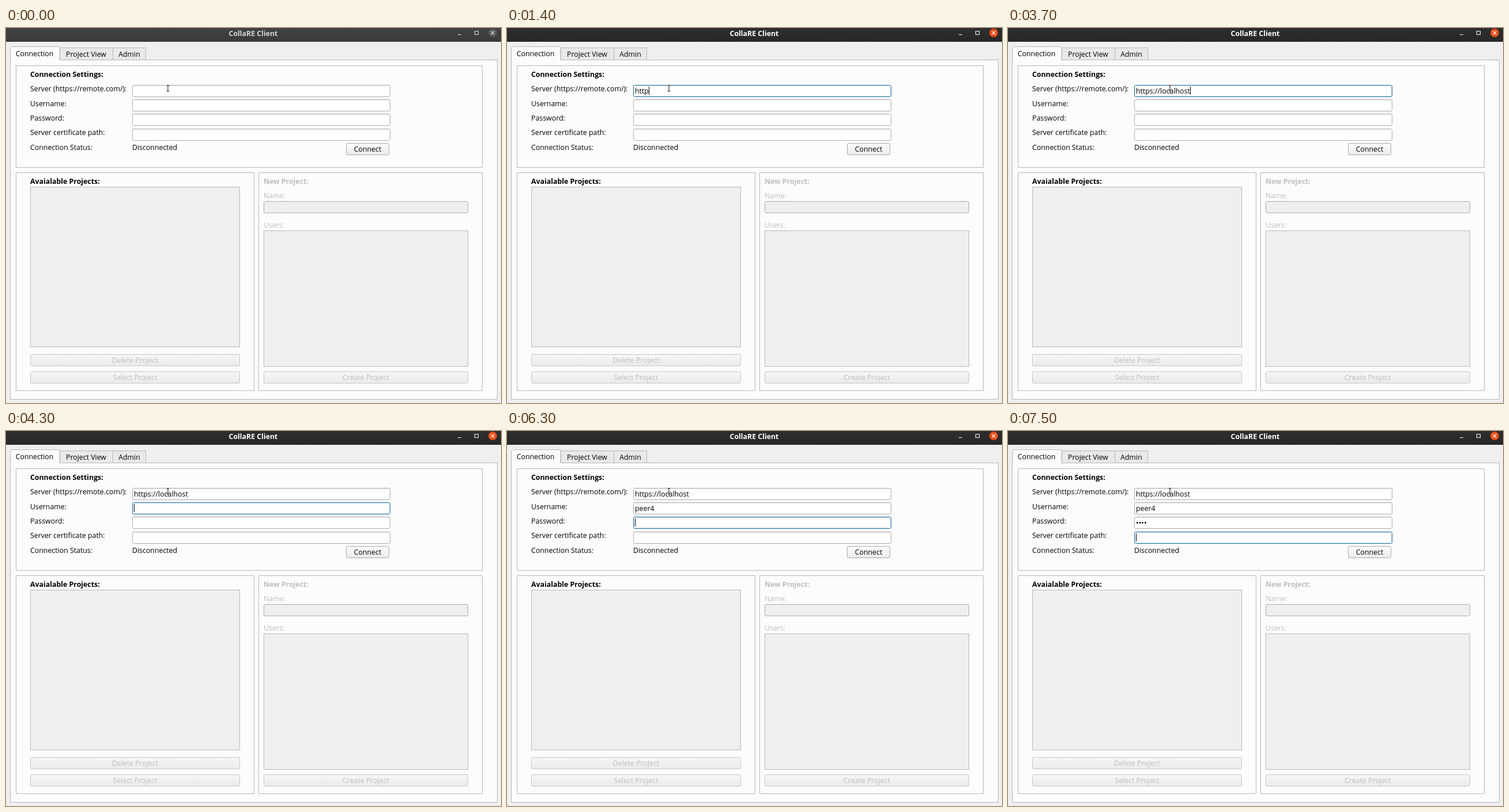
An HTML page for the animation above (8000 ms loop, 859 by 652 pixels).

```html
<!DOCTYPE html>
<html lang="en">
<head>
<meta charset="utf-8">
<title>CollaRE Client</title>
<style>
  html, body { margin: 0; width: 100%; height: 100%; overflow: hidden; background: #efefef; }
  svg { display: block; }
  text { font: 12.35px "Open Sans", "Noto Sans", sans-serif; white-space: pre; }
  .bold { font-weight: 700; }
  .mid { text-anchor: middle; }
  .off { fill: #bebebe; }
</style>
</head>
<body>
<svg id="stage" width="859" height="652" viewBox="0 0 859 652">
  <defs>
    <linearGradient id="button" x2="0" y2="1"><stop stop-color="#fcfcfc"/><stop offset="1" stop-color="#ebebeb"/></linearGradient>
    <linearGradient id="disabled" x2="0" y2="1"><stop stop-color="#f6f6f6"/><stop offset="1" stop-color="#ebebeb"/></linearGradient>
    <linearGradient id="idle" x2="0" y2="1"><stop stop-color="#424242"/><stop offset="1" stop-color="#3a3a3a"/></linearGradient>
    <linearGradient id="active" x2="0" y2="1"><stop stop-color="#2e2e2e"/><stop offset="1" stop-color="#272727"/></linearGradient>
  </defs>
</svg>
<script>
const stage = document.getElementById('stage');
const LOOP = 8000, ACTIVATE = 300;
const OUTLINE = '#ababab', FRAME = '#b8b8b8', FOCUS = '#266f9e';

function add(tag, attrs, content = '') {
  const el = document.createElementNS('http://www.w3.org/2000/svg', tag);
  for (const key in attrs) el.setAttribute(key, attrs[key]);
  el.textContent = content;
  return stage.appendChild(el);
}
// Outlined box covering whole pixels x..x+width, y..y+height
const box = (x, y, width, height, fill, stroke, rx = 0) =>
  add('rect', { x: x + .5, y: y + .5, width: width - 1, height: height - 1, fill, stroke, rx });
const label = (x, y, content, cls = '') => add('text', { x, y, class: cls }, content);
const path = (d, stroke, width = 1) => add('path', { d, stroke, fill: 'none', 'stroke-width': width });

function button(x, y, width, content, enabled) {
  box(x, y, width, 21, `url(#${enabled ? 'button' : 'disabled'})`, enabled ? OUTLINE : '#c6c6c6', 2);
  label(x + width / 2, y + 15, content, enabled ? 'mid' : 'mid off');
}

// Title bar
const bar = add('rect', { width: 859, height: 24 });
const title = label(429, 13.5, 'CollaRE Client', 'bold mid');
const close = add('circle', { cx: 844.5, cy: 8.5, r: 7.5 });
const icons = path('M784 11.5h6M813.5 5.5h6v6h-6zM841.5 5.5l6 6M847.5 5.5l-6 6', '#fff', 1.1);

// Tabs
box(7, 55, 846, 591, '#fcfcfc', FRAME);
box(93, 34, 93, 22, '#e9e9e9', FRAME);
box(185, 34, 58, 22, '#e9e9e9', FRAME);
path('M7.5 56V34.5q0-2 2-2h81.5q2 0 2 2V56', FRAME).setAttribute('fill', '#fcfcfc');
label(49.5, 49, 'Connection', 'mid');
label(139, 50, 'Project View', 'mid');
label(214, 50, 'Admin', 'mid');

// Connection settings
box(17, 65, 810, 178, 'none', FRAME);
label(42, 85, 'Connection Settings:', 'bold');
['Server (https://remote.com/):', 'Username:', 'Password:', 'Server certificate path:', 'Connection Status:']
  .forEach((name, i) => label(42, 110.4 + i * 25.3, name));
label(219, 212, 'Disconnected');
button(590, 200, 75, 'Connect', true);

// Projects
box(17, 251, 414, 380, 'none', FRAME);
label(42, 271, 'Avaialable Projects:', 'bold');
box(42, 276, 364, 279, '#efefef', FRAME);
button(42, 567, 364, 'Delete Project');
button(42, 597, 364, 'Select Project');

box(438, 251, 389, 380, 'none', FRAME);
label(447, 271, 'New Project:', 'bold off');
label(447, 296, 'Name:', 'off');
box(447, 301, 355, 21, '#efefef', OUTLINE, 2);
label(447, 347, 'Users:', 'off');
box(447, 352, 355, 237, '#efefef', FRAME);
button(447, 597, 355, 'Create Project');

// Input fields: focus time, one time per key, and when the caret blinks out
const fields = [
  { top: 99, value: 'https://localhost', focus: 300, hide: 900,
    keys: [1000, 1200, 1300, 1400, 1600, 1800, 2100, 2200, 2700, 2900, 3000, 3100, 3100, 3300, 3400, 3500, 3700] },
  { top: 124, value: 'peer4', focus: 4300, hide: 5000, keys: [5500, 5600, 5700, 5800, 6000] },
  { top: 149, value: '••••', focus: 6300, keys: [6800, 6900, 7100, 7200] },
  { top: 175, value: '', focus: 7500, keys: [] }
];
fields.forEach((field, i) => {
  const { top } = field;
  field.blur = fields[i + 1]?.focus ?? LOOP;
  field.box = box(219, top, 448, 21, '#fff', OUTLINE, 2);
  field.shade = path(`M221 ${top + 1.5}h444`, '#f0f0f0');
  field.glow = box(220, top + 1, 446, 19, 'none', '#d5e8f4', 1);
  field.text = label(222, top + 15, '');
  field.caret = add('rect', { y: top + 3, width: 1, height: 14 });
});

// Text pointer
const beam = 'M278.5 99.5h1.5l1 1 1-1h1.5M281 100v9.5M278.5 110h1.5l1-1 1 1h1.5';
path(beam, '#fff', 2.4).setAttribute('opacity', .6);
path(beam, '#222', 1.1);

const show = (el, on) => el.setAttribute('visibility', on ? 'visible' : 'hidden');

function draw() {
  const t = performance.now() % LOOP;
  const active = t >= ACTIVATE;
  bar.setAttribute('fill', `url(#${active ? 'active' : 'idle'})`);
  title.setAttribute('fill', active ? '#fff' : '#d6d6d6');
  icons.setAttribute('stroke', active ? '#fff' : '#dedede');
  close.setAttribute('fill', active ? '#e64c18' : '#575757');

  for (const f of fields) {
    const focused = t >= f.focus && t < f.blur;
    const count = f.keys.filter(k => t >= k).length;
    f.text.textContent = f.value.slice(0, count);
    f.box.setAttribute('stroke', focused ? FOCUS : OUTLINE);
    show(f.glow, focused);
    show(f.shade, !focused);
    show(f.caret, focused && !(t >= f.hide && count === 0));
    f.caret.setAttribute('x', 222 + Math.round(count ? f.text.getComputedTextLength() : 0));
  }
  requestAnimationFrame(draw);
}
draw();
</script>
</body>
</html>
```
